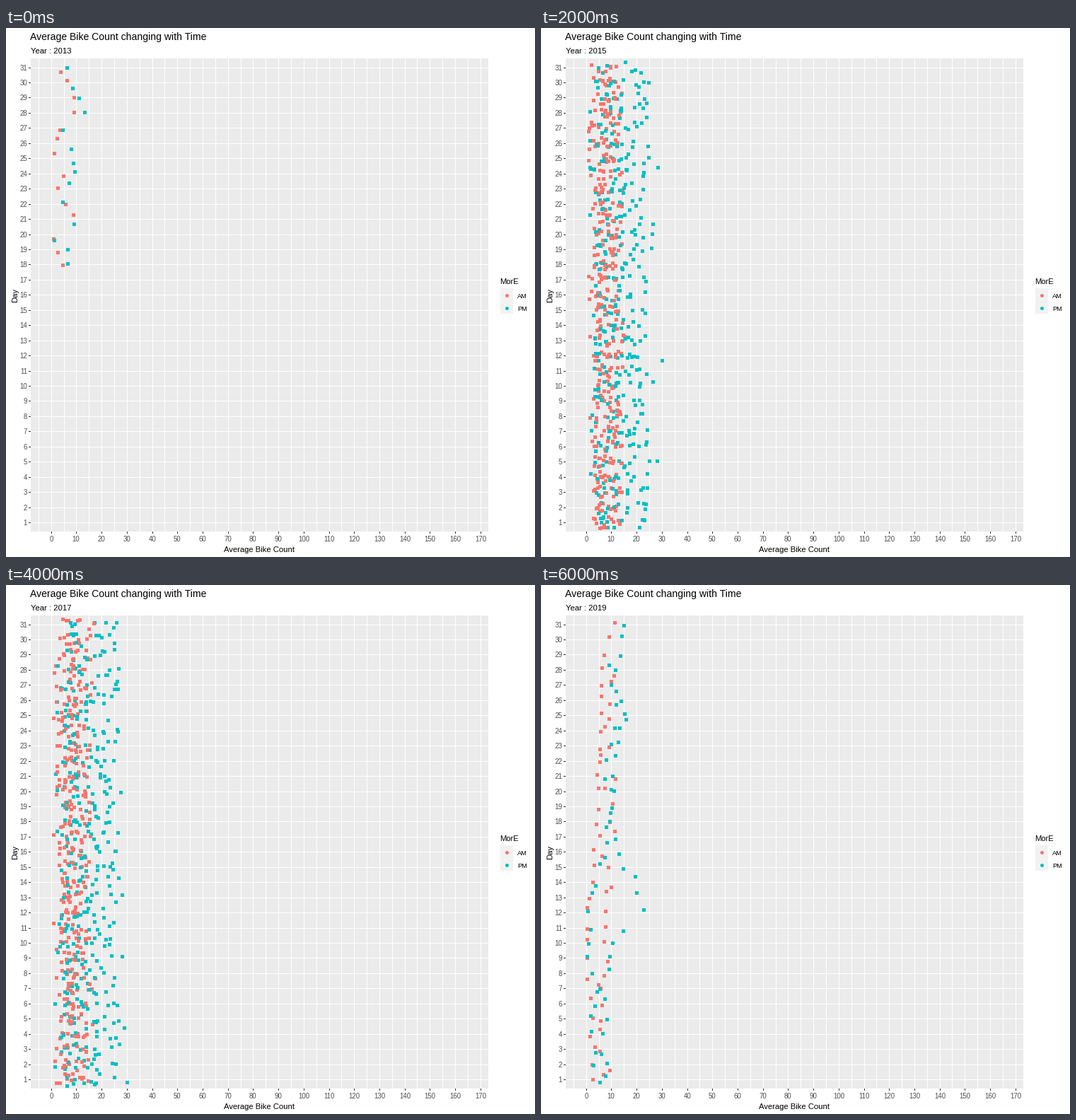
A matplotlib script for the animation above (7000 ms loop, 748x748 px).

```python
import numpy as np
import matplotlib.pyplot as plt
from matplotlib.animation import FuncAnimation
from matplotlib.patches import Rectangle

SIZE, DPI = 748, 88
PX = 72 / DPI  # points per pixel
AM, PM = "#F8766D", "#00BFC4"
LEFT, RIGHT, TOP, BOTTOM = 35, 682, 43, 712
DOT = 5

plt.rcParams["font.family"] = "Liberation Sans"
fig = plt.figure(figsize=(SIZE / DPI, SIZE / DPI), dpi=DPI, facecolor="white")
ax = fig.add_axes([0, 0, 1, 1])
ax.set(xlim=(0, SIZE), ylim=(SIZE, 0))
ax.axis("off")


def x_of(count):
    return 63.75 + 3.5706 * count


def y_of(day):
    return 720.53 - 21.45 * day


def rect(x, y, w, h, color):
    ax.add_patch(Rectangle((x, y), w, h, fc=color, lw=0, antialiased=False))


def label(x, y, text, size, color="black", **kw):
    return ax.text(x, y, text, fontsize=size * PX, color=color,
                   va="baseline", **kw)


def dots(xy, colors):
    x, y = np.transpose(xy)
    return ax.scatter(x, y, s=(DOT * PX) ** 2, c=colors, linewidths=0,
                      antialiased=False, zorder=3)


# Panel, grid, ticks
rect(LEFT, TOP, RIGHT - LEFT, BOTTOM - TOP, "#EBEBEB")
for count in range(-5, 171, 5):
    x = round(x_of(count))
    rect(x, TOP, 1, BOTTOM - TOP, "white")
    if count >= 0 and count % 10 == 0:
        rect(x, BOTTOM, 1, 3, "#333333")
        label(x, 726, str(count), 9.6, "#4D4D4D", ha="center")
for day in range(1, 32):
    y = round(y_of(day))
    rect(LEFT, y, RIGHT - LEFT, 1, "white")
    rect(LEFT - 3, y, 3, 1, "#333333")
    label(30, y + 4, str(day), 9.6, "#4D4D4D", ha="right")

# Titles and legend
label(34.5, 17, "Average Bike Count changing with Time", 14)
subtitle = label(35, 35.5, "", 11.2)
label(358, 741, "Average Bike Count", 11.2, ha="center")
label(16.5, 377.5, "Day", 11.2, rotation=90, rotation_mode="anchor",
      ha="center")
label(698.5, 362, "MorE", 11.2)
rect(699, 368, 18, 36, "#F2F2F2")
for name, y, color in (("AM", 377.5, AM), ("PM", 395.5, PM)):
    dots([(708.5, y)], [color])
    label(722.8, y + 4.5, name, 9.3)

MONTH_DAYS = (31, 28, 31, 30, 31, 30, 31, 31, 30, 31, 30, 31)

# Single readings far from the rest: year -> (count, day, colour)
OUTLIERS = {
    2014: [(33.3, 31.3, PM), (33.3, 21.2, PM), (34.4, 7.9, PM)],
    2016: [(42, 29.7, PM), (39.2, 6.9, PM)],
    2018: [(165, 29.7, AM)],
}


def full_year(year, rng):
    """Counts that rise in summer and fall on weekends and rainy days."""
    points, date = [], 0
    for month, days in enumerate(MONTH_DAYS):
        warm = (1 - np.cos(2 * np.pi * (month - 0.2) / 12)) / 2
        for day in range(1, days + 1):
            date += 1
            weekend = (date + year) % 7 < 2
            rain = 0.5 if rng.random() < 0.1 else 1
            am = (6 + 8 * warm) * (0.6 if weekend else 1) * rain
            pm = (6.5 + 18.5 * warm) * (0.75 if weekend else 1) * rain
            if year == 2015:
                am, pm = 0.93 * am, 0.93 * pm
            points.append((max(1, rng.normal(am, 1.3)), day, AM))
            points.append((max(1.5, rng.normal(pm, 2.4)), day, PM))
    return [points[i] for i in rng.permutation(len(points))]


def trace(rng, first, last, keys, color, noise):
    """One reading a day along a line through (day, count) keys."""
    days = np.arange(first, last + 1)
    counts = np.interp(days, *np.transpose(keys))
    counts = counts + rng.normal(0, noise, len(days))
    return [(max(0.3, c), d, color) for c, d in zip(counts, days)]


def first_weeks(rng):
    am = [(18, 4.5), (20, 0.9), (21, 8.7), (23, 2.5), (24, 4.8), (25, 1.1),
          (27, 3.4), (28, 9), (29, 9), (31, 3.6)]
    pm = [(18, 6.4), (19, 6.6), (20, 1.2), (21, 9), (22, 4.6), (24, 9.3),
          (26, 8), (27, 4.6), (28, 13.2), (31, 6.2)]
    return trace(rng, 18, 31, am, AM, 0) + trace(rng, 18, 31, pm, PM, 0)


def last_months(rng):
    """A steady month and a shorter one with a near-empty week."""
    steady_pm = [(1, 8), (6, 7), (10, 11), (12, 21), (13, 21), (15, 14),
                 (18, 9), (25, 14), (31, 14)]
    quiet_am = [(1, 3), (7, 3), (9, 0.2), (12, 0.2), (18, 5), (28, 6)]
    quiet_pm = [(1, 6), (4, 1.5), (7, 4.5), (9, 0.5), (12, 0.5), (17, 9),
                (22, 8), (25, 14), (28, 9)]
    return (trace(rng, 1, 31, [(1, 7), (31, 9.5)], AM, 1.8)
            + trace(rng, 1, 28, quiet_am, AM, 0.6)
            + trace(rng, 1, 31, steady_pm, PM, 1.4)
            + trace(rng, 1, 28, quiet_pm, PM, 0.7))


def year_points(year):
    """Stage positions, jittered around each day, and colours."""
    rng = np.random.default_rng(year)
    if year == 2013:
        points = first_weeks(rng)
    elif year == 2019:
        points = last_months(rng)
    else:
        points = full_year(year, rng)
    points = [(c, d + rng.uniform(-0.4, 0.4), col) for c, d, col in points]
    points += OUTLIERS.get(year, [])
    spots = [(round(x_of(c)) + 0.5, round(y_of(d)) + 0.5)
             for c, d, _ in points]
    return spots, [col for _, _, col in points]


YEARS = [year_points(year) for year in range(2013, 2020)]
cloud = dots(*YEARS[0])


def draw(i):
    spots, colors = YEARS[i]
    cloud.set_offsets(spots)
    cloud.set_facecolor(colors)
    subtitle.set_text(f"Year : {2013 + i}")
    return cloud, subtitle


anim = FuncAnimation(fig, draw, frames=len(YEARS), interval=1000,
                     repeat=True, repeat_delay=0)
plt.show()
```
